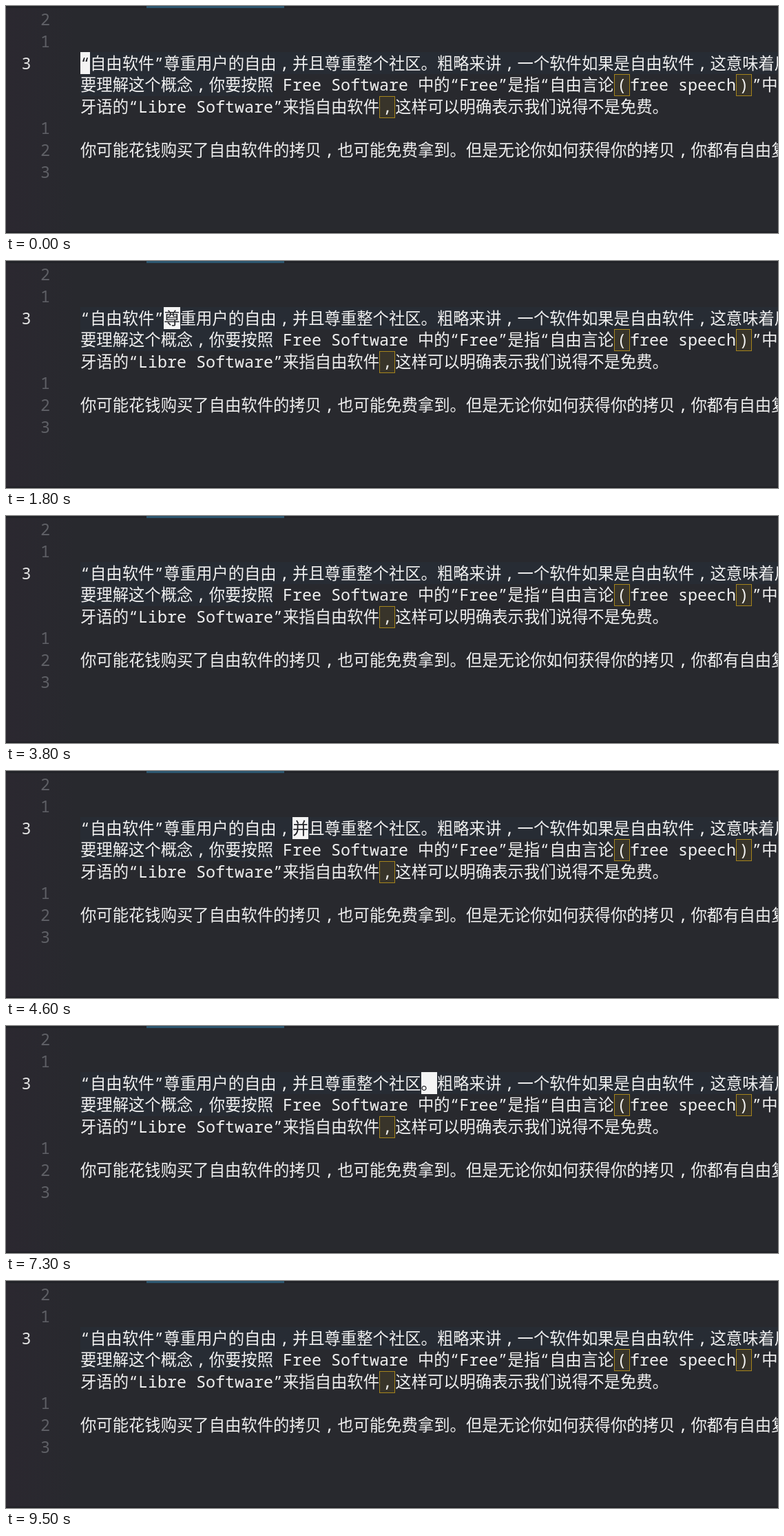
Animation of 1121 by 330 pixels, one loop 9.7 s. Source, as an HTML page with a canvas:

```html
<!DOCTYPE html>
<html lang="zh-CN">
<head>
<meta charset="utf-8">
<style>
html, body { margin: 0; width: 100%; height: 100%; overflow: hidden; background: #28292e; }
canvas { display: block; }
</style>
</head>
<body>
<canvas id="stage" width="1121" height="330"></canvas>
<script>
const ctx = document.getElementById('stage').getContext('2d');
const LOOP = 9700, HOLD = 300;
const EM = 23.33, HALF = 14, LEFT = 108, ROW = 31.65, CURRENT = 2;
const BG = '#28292e', FG = '#f0f0f0', DIM = '#5f6066', ACTIVE = '#272c34';
const FONT = `${EM}px "Noto Sans Mono", "Noto Sans CJK SC", "Noto Sans CJK", monospace`;
const CENTERED = { '，': ',', '（': '(', '）': ')' };

const lines = {
  2: '“自由软件”尊重用户的自由，并且尊重整个社区。粗略来讲，一个软件如果是自由软件，这意味着用',
  3: '要理解这个概念，你要按照 Free Software 中的“Free”是指“自由言论（free speech）”中的',
  4: '牙语的“Libre Software”来指自由软件，这样可以明确表示我们说得不是免费。',
  6: '你可能花钱购买了自由软件的拷贝，也可能免费拿到。但是无论你如何获得你的拷贝，你都有自由复制'
};

// The cursor jumps word by word, at these tenths of a second, and blinks off after HOLD.
const words = '“ 自由软件 ” 尊重 用户 的 自由 ， 并且 尊重 整个 社区 。 粗略 来讲 ，'.split(' ');
const jumps = [-1, 6, 12, 18, 23, 29, 34, 40, 45, 52, 56, 66, 73, 79, 84, 90];

const rowTop = row => 4 + row * ROW;
const advance = ch => ch < '\u2e80' ? HALF : EM;
const width = text => [...text].reduce((sum, ch) => sum + advance(ch), 0);

function rect(x, y, w, h, color) {
  ctx.fillStyle = color;
  ctx.fillRect(x, y, w, h);
}

function glyph(ch, x, row, color) {
  const narrow = CENTERED[ch];
  ctx.fillStyle = color;
  ctx.fillText(narrow || ch, x + (narrow ? (EM - HALF) / 2 : 0), rowTop(row) + 24.2);
}

function marker(row, ch) {
  const before = lines[row].slice(0, lines[row].lastIndexOf(ch));
  const x = Math.round(LEFT + width(before)), y = Math.round(rowTop(row));
  rect(x, y, 23, 32, '#38342a');
  ctx.strokeStyle = '#a5841c';
  ctx.strokeRect(x + .5, y + .5, 22, 31);
}

function cursor(time) {
  const i = jumps.findLastIndex(jump => time >= jump * 100);
  if (time >= jumps[i] * 100 + HOLD) return;
  const x = LEFT + width(words.slice(0, i).join('')), ch = words[i][0];
  const left = Math.round(x);
  rect(left, 67, Math.round(x + advance(ch)) - left, 32, '#f4f4f4');
  glyph(ch, x, CURRENT, '#202126');
}

function draw(time) {
  rect(0, 0, 1121, 330, BG);
  const edge = ctx.createLinearGradient(0, 0, 100, 0);
  edge.addColorStop(0, '#2b2830');
  edge.addColorStop(1, BG);
  rect(0, 0, 100, 330, edge);
  rect(0, 0, 1121, 3, '#222328');
  rect(204, 0, 200, 3, '#2c566f');
  rect(0, 328, 1121, 2, '#202126');
  rect(LEFT, 67, 1013, 32, ACTIVE);
  rect(LEFT, 99, 280, 32, ACTIVE);

  marker(3, '（');
  marker(3, '）');
  marker(4, '，');

  ctx.font = FONT;
  for (const row of [0, 1]) glyph(String(CURRENT - row), 50, row, DIM);
  for (const row of [5, 6, 7]) glyph(String(row - 4), 50, row, DIM);
  glyph('3', 22.5, CURRENT, '#e4e4e4');
  for (const row in lines) {
    let x = LEFT;
    for (const ch of lines[row]) {
      glyph(ch, x, +row, FG);
      x += advance(ch);
    }
  }
  cursor(time);
}

const began = performance.now();
function tick() {
  draw((performance.now() - began) % LOOP);
  requestAnimationFrame(tick);
}
tick();
</script>
</body>
</html>
```
